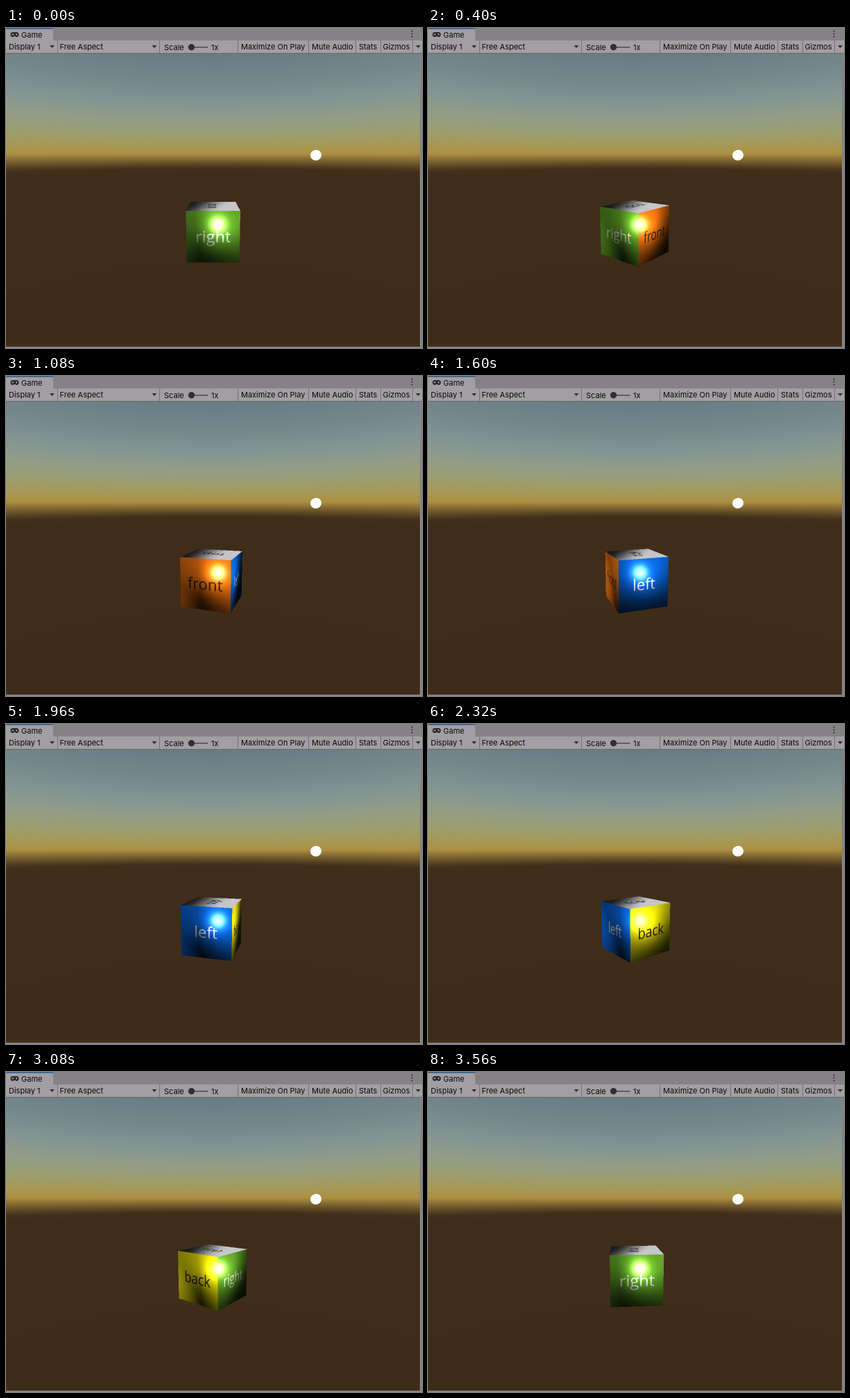
An HTML page with a canvas that plays this animation: 600x462 px, repeating every 3600 ms.

```html
<!DOCTYPE html>
<html lang="en">
<head>
<meta charset="utf-8">
<title>Rotating cube</title>
<style>
  html, body { margin: 0; width: 100%; height: 100%; overflow: hidden; background: #848284; }
  canvas { display: block; }
</style>
</head>
<body>
<canvas id="stage" width="600" height="462"></canvas>
<script>
const LOOP = 3600, STEP = 40;
const VIEW = { x: 0, y: 37, w: 597, h: 423 };
const CX = 298.7, CY = 248, FOCAL = 365;
const SIN = 0.158, COS = Math.sqrt(1 - SIN * SIN);
const HORIZON = 184;
const EYE = { y: 1.435, z: -5.053 };
const KEY_LIGHT = [0.33, 0.545, -0.79];
const FILL_LIGHT = [-0.86, -0.1, 0.5];
const SPOT = { x: 306, y: 284 };
const BOX = { x: 238, y: 240, w: 122, h: 112 };
const TEX = 128;

const ctx = document.getElementById('stage').getContext('2d');
const clamp = (v, lo = 0, hi = 1) => Math.min(hi, Math.max(lo, v));
const bell = (d, width) => Math.exp(-((d / width) ** 2));
const lambert = (n, light) => Math.max(0, n[0] * light[0] + n[1] * light[1] + n[2] * light[2]);

function makeCanvas(w, h) {
  const c = document.createElement('canvas');
  c.width = w;
  c.height = h;
  return c;
}

// Sky colours by height on the centre column.
const SKY = [
  [37, 103, 123, 131], [75, 114, 134, 139], [110, 131, 149, 146],
  [135, 146, 157, 135], [155, 156, 158, 112], [172, 167, 152, 84],
  [182, 173, 143, 66], [186, 150, 122, 56], [193, 112, 88, 43],
  [199, 80, 61, 33], [203, 65, 47, 27], [212, 63, 45, 27], [460, 62, 44, 24]
];

function skyColor(y) {
  let i = 1;
  while (i < SKY.length - 1 && y > SKY[i][0]) i++;
  const a = SKY[i - 1], b = SKY[i];
  const k = clamp((y - a[0]) / (b[0] - a[0]));
  return [1, 2, 3].map(n => a[n] + (b[n] - a[n]) * k);
}

// Bands of equal elevation curve because the camera looks down.
function paintSky(c) {
  const pitch = Math.atan((CY - HORIZON) / FOCAL);
  const sin = Math.sin(pitch), cos = Math.cos(pitch);
  const img = c.createImageData(VIEW.w, VIEW.h);
  for (let py = 0, o = 0; py < VIEW.h; py++) {
    for (let px = 0; px < VIEW.w; px++, o += 4) {
      const u = (px + VIEW.x + 0.5 - CX) / FOCAL;
      const w = (CY - py - VIEW.y - 0.5) / FOCAL;
      const elevation = Math.asin((w * cos - sin) / Math.hypot(u, w, 1));
      const [r, g, b] = skyColor(CY - FOCAL * Math.tan(elevation + pitch));
      img.data[o] = r;
      img.data[o + 1] = g;
      img.data[o + 2] = b;
      img.data[o + 3] = 255;
    }
  }
  c.putImageData(img, VIEW.x, VIEW.y);
}

function paintToolbar(c) {
  const rect = (color, x, y, w, h) => { c.fillStyle = color; c.fillRect(x, y, w, h); };
  const disc = (color, x, y, r) => {
    c.fillStyle = color;
    c.beginPath();
    c.arc(x, y, r, 0, Math.PI * 2);
    c.fill();
  };
  const label = (text, x, y) => { c.fillStyle = '#080808'; c.fillText(text, x, y); };
  const arrow = x => {
    c.fillStyle = '#333133';
    c.beginPath();
    c.moveTo(x - 3.5, 25);
    c.lineTo(x + 3.5, 25);
    c.lineTo(x, 29);
    c.fill();
  };

  rect('#848284', 0, 0, 600, 18);
  rect('#a29fa2', 0, 0, 68, 18);
  rect('#2e5b8d', 0, 0, 68, 1.5);
  rect('#a29fa2', 0, 18, 600, 18);
  rect('#6b696b', 0, 36, 600, 1);
  for (const x of [74, 221, 334, 436, 504, 540, 586]) rect('#737173', x, 18, 1, 18);

  c.fillStyle = '#292829';
  c.beginPath();
  c.roundRect(6.5, 6, 12, 7, 3.4);
  c.fill();
  disc('#a29fa2', 9.8, 9.3, 1.2);
  disc('#a29fa2', 15.2, 9.3, 1.2);
  rect('#a29fa2', 11, 12, 3, 1);
  for (const y of [4.5, 8.5, 12.5]) disc('#292829', 585.5, y, 1);

  c.font = '11px Inter, sans-serif';
  label('Game', 22, 13.5);
  label('Display 1', 4, 31);
  label('Free Aspect', 77.5, 31);
  label('Scale', 228, 31.5);
  label('1x', 296, 31.5);
  label('Maximize On Play', 339, 31);
  label('Mute Audio', 441, 31);
  label('Stats', 509, 31);
  label('Gizmos', 543.5, 31);
  [66.5, 214, 594.5].forEach(arrow);

  rect('#4a484a', 270, 27, 21, 1.5);
  disc('#312f31', 267.5, 27.8, 4.7);
}

function paintBackdrop() {
  const canvas = makeCanvas(600, 462), c = canvas.getContext('2d');
  c.fillStyle = '#848284';
  c.fillRect(0, 0, 600, 462);
  paintSky(c);
  paintToolbar(c);
  c.fillStyle = '#ffffff';
  c.beginPath();
  c.ellipse(447, 183.6, 8.1, 7.5, -0.2, 0, Math.PI * 2);
  c.fill();
  return canvas;
}

function makeFace(text, color, ink) {
  const c = makeCanvas(TEX, TEX).getContext('2d');
  c.fillStyle = color;
  c.fillRect(0, 0, TEX, TEX);
  c.fillStyle = ink;
  c.font = `500 ${TEX * 0.305}px "Open Sans", "Noto Sans", sans-serif`;
  c.textAlign = 'center';
  c.fillText(text, TEX / 2, TEX * 0.6);
  return c.getImageData(0, 0, TEX, TEX).data;
}

const faces = {
  right: makeFace('right', 'rgb(98,165,38)', '#fff'),
  front: makeFace('front', 'rgb(236,112,14)', '#1c1a18'),
  left: makeFace('left', 'rgb(10,100,215)', '#fff'),
  back: makeFace('back', 'rgb(226,216,8)', '#1c1a18'),
  top: makeFace('top', 'rgb(226,226,232)', '#1c1a18')
};

function sample(face, u, v) {
  const x = clamp(u * TEX - 0.5, 0, TEX - 1.001), y = clamp(v * TEX - 0.5, 0, TEX - 1.001);
  const x0 = x | 0, y0 = y | 0, fx = x - x0, fy = y - y0;
  const o = (y0 * TEX + x0) * 4, below = o + TEX * 4;
  return [0, 1, 2].map(n =>
    (face[o + n] * (1 - fx) + face[o + 4 + n] * fx) * (1 - fy) +
    (face[below + n] * (1 - fx) + face[below + 4 + n] * fx) * fy);
}

// Rounded normals keep the light and its highlight still while the cube turns.
function lightSide(color, x, y, point) {
  const length = Math.hypot(...point);
  const normal = point.map(v => v / length);
  const d = Math.hypot(x - SPOT.x, y - SPOT.y);
  const key = lambert(normal, KEY_LIGHT) ** 1.4;
  const fill = 0.7 * lambert(normal, FILL_LIGHT);
  const k = Math.min(1, 0.08 + key + fill) + 0.5 * bell(d, 18);
  const shine = 225 * bell(d, 10);
  return color.map(v => v * k + shine);
}

function lightTop(color, x, y) {
  const k = clamp((x - 262 + (y - 256) * 1.5) / 58);
  return color.map(v => v * (0.12 + 0.75 * k * k * (3 - 2 * k)));
}

// Colour of the cube along the ray through a screen point, or null.
function trace(x, y, sin, cos) {
  const u = (x - CX) / FOCAL, w = (CY - y) / FOCAL;
  const dy = w * COS - SIN, dz = w * SIN + COS;
  const da = -sin * u - cos * dz, db = cos * u - sin * dz;
  const oa = -cos * EYE.z, ob = -sin * EYE.z;

  const slab = (o, d) => [(-Math.sign(d) * 0.5 - o) / d, (Math.sign(d) * 0.5 - o) / d];
  const [a0, a1] = slab(oa, da || 1e-9);
  const [b0, b1] = slab(ob, db || 1e-9);
  const [y0, y1] = slab(EYE.y, dy);
  const t = Math.max(a0, b0, y0);
  if (t > Math.min(a1, b1, y1)) return null;

  const a = oa + da * t, b = ob + db * t, height = EYE.y + dy * t;
  if (t === y0) return lightTop(sample(faces.top, a + 0.5, 0.5 - b), x, y);

  const [face, across] = t === a0
    ? (da < 0 ? [faces.right, b] : [faces.left, -b])
    : (db < 0 ? [faces.front, -a] : [faces.back, a]);
  return lightSide(sample(face, across + 0.5, 0.5 - height), x, y, [u * t, height, EYE.z + dz * t]);
}

const cube = makeCanvas(BOX.w, BOX.h);
const cubeCtx = cube.getContext('2d');
const cubeImage = cubeCtx.createImageData(BOX.w, BOX.h);

function paintCube(angle) {
  const sin = Math.sin(angle), cos = Math.cos(angle), data = cubeImage.data;
  for (let py = 0, o = 0; py < BOX.h; py++) {
    for (let px = 0; px < BOX.w; px++, o += 4) {
      let hits = 0, r = 0, g = 0, b = 0;
      for (let s = 0; s < 4; s++) {
        const color = trace(BOX.x + px + 0.25 + (s & 1) / 2, BOX.y + py + 0.25 + (s >> 1) / 2, sin, cos);
        if (!color) continue;
        hits++;
        r += Math.min(255, color[0]);
        g += Math.min(255, color[1]);
        b += Math.min(255, color[2]);
      }
      data[o] = r / (hits || 1);
      data[o + 1] = g / (hits || 1);
      data[o + 2] = b / (hits || 1);
      data[o + 3] = hits * 63.75;
    }
  }
  cubeCtx.putImageData(cubeImage, 0, 0);
}

const backdrop = paintBackdrop();
let shown = -1;

function render(time) {
  const step = Math.floor((time % LOOP) / STEP);
  if (step === shown) return;
  shown = step;
  paintCube(step * STEP / LOOP * Math.PI * 2);
  ctx.drawImage(backdrop, 0, 0);
  ctx.drawImage(cube, BOX.x, BOX.y);
}

const start = performance.now();
function tick() {
  render(performance.now() - start);
  requestAnimationFrame(tick);
}
tick();
</script>
</body>
</html>
```
